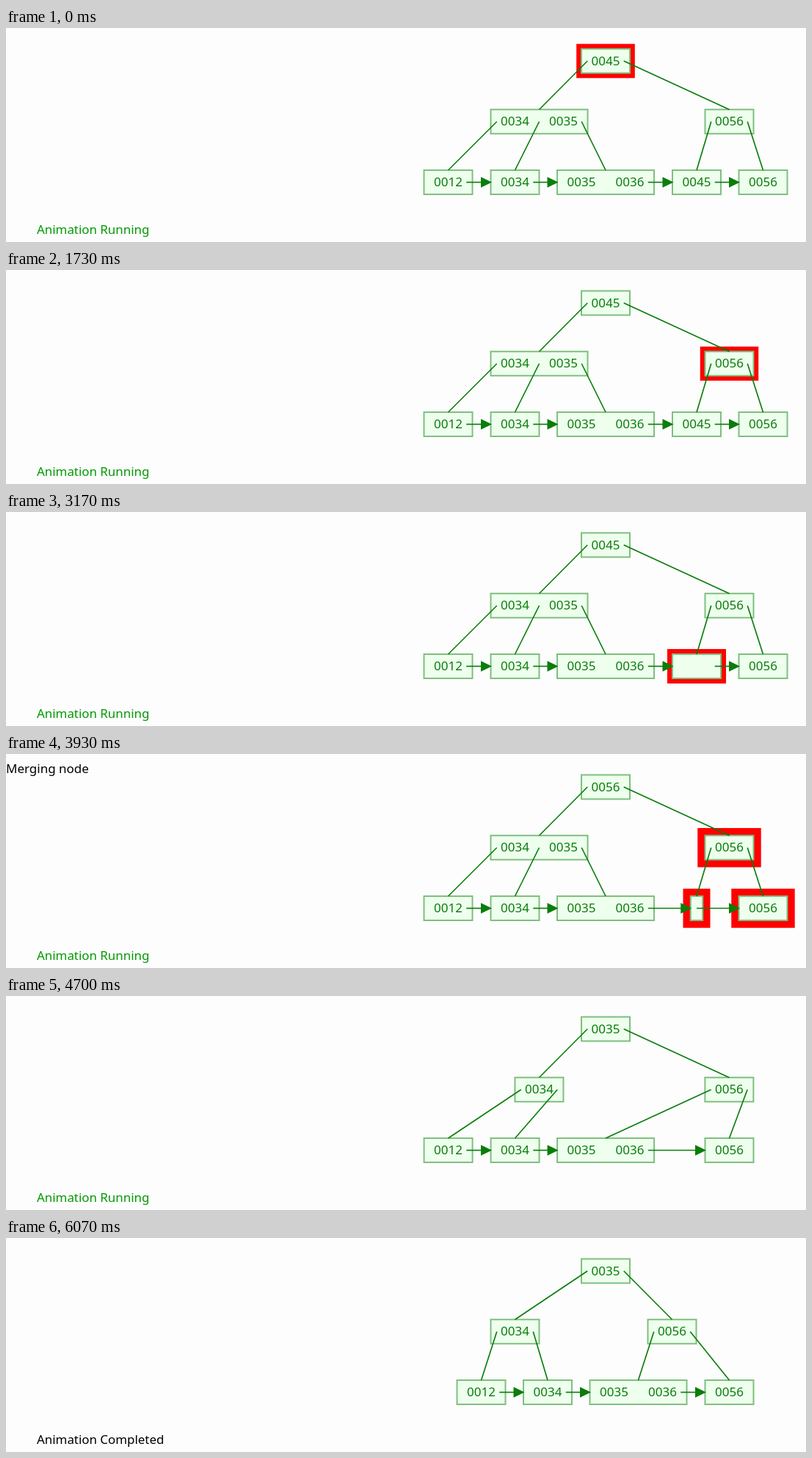
These frames come from a looping animation (1090 by 292 pixels, 6110 ms). An HTML page with a canvas:

```html
<!DOCTYPE html>
<html lang="en">
<head>
<meta charset="utf-8">
<title>B+ tree deletion</title>
<style>
  html, body { margin: 0; width: 100%; height: 100%; overflow: hidden; background: #fdfdfd; }
  canvas { display: block; }
</style>
</head>
<body>
<canvas id="stage" width="1090" height="292"></canvas>
<script>
const ctx = document.getElementById('stage').getContext('2d');

const LOOP = 6110, FIRST_STEP = 464, STEP = 706;
const UNIT = 1.65, ELEMENT = 40 * UNIT, HEIGHT = 20 * UNIT, INSET = 5 * UNIT;
const ROWS = [45, 127.75, 210.5];
const PAPER = '#fdfdfd', FILL = '#eeffee', BORDER = '#7fbf7f', GREEN = '#0a7d0a', RED = '#ff0000';
const FONT = '"Noto Sans", "Open Sans", sans-serif';

// Phases: each lasts one step
const ROOT = 0, ROOT_EDGE = 1, INNER = 2, INNER_EDGE = 3, LEAF = 4, MERGE = 5, STEAL = 6, MOVE = 7, DONE = 8;

const mix = (a, b, p) => a + (b - a) * p;
const width = n => n.keys.length * ELEMENT || 2 * INSET;
const left = n => n.x - width(n) / 2;
const slotX = (n, i) => left(n) + INSET + i * (width(n) - 2 * INSET) / Math.max(1, n.keys.length);
const makeNode = (x, row, keys, lit = false) => ({ x, y: ROWS[row], keys, lit });

// Triangle wave from 0 to 1
function pulse(t) {
  const phase = (t + 140) / 1740 % 1;
  return 1 - Math.abs(2 * phase - 1);
}

function text(str, x, y, color, align = 'center', size = 17) {
  ctx.font = `${size}px ${FONT}`;
  ctx.textAlign = align;
  ctx.fillStyle = color;
  ctx.fillText(str, x, y);
}

function line(x1, y1, x2, y2, color = GREEN, w = UNIT) {
  ctx.strokeStyle = color;
  ctx.lineWidth = w;
  ctx.beginPath();
  ctx.moveTo(x1, y1);
  ctx.lineTo(x2, y2);
  ctx.stroke();
}

function drawNode(n, wave) {
  const x = left(n), y = n.y - HEIGHT / 2, w = width(n);
  if (n.lit) {
    const d = (3 + 4 * wave) * UNIT + 0.8;
    ctx.fillStyle = RED;
    ctx.fillRect(x - d, y - d, w + 2 * d, HEIGHT + 2 * d);
  }
  ctx.fillStyle = FILL;
  ctx.fillRect(x, y, w, HEIGHT);
  ctx.strokeStyle = BORDER;
  ctx.lineWidth = 2;
  ctx.strokeRect(x, y, w, HEIGHT);
  n.keys.forEach((key, i) => text(key, x + ELEMENT * (i + 0.5), n.y + 5.5, GREEN));
}

function drawEdge({ from, slot, to, lit }, wave) {
  const ends = [slotX(from, slot), from.y, to.x, to.y - HEIGHT / 2];
  if (lit) line(...ends, RED, (3 + 2 * wave) * UNIT);
  line(...ends);
}

function drawLink(from, to) {
  const tip = left(to) + 1.5, y = from.y;
  line(slotX(from, from.keys.length), y, tip - 8, y);
  ctx.fillStyle = GREEN;
  ctx.beginPath();
  ctx.moveTo(tip, y);
  ctx.lineTo(tip - 15, y - 7.2);
  ctx.lineTo(tip - 15, y + 7.2);
  ctx.fill();
}

function buildTree(phase, p) {
  const moved = phase < MOVE ? 0 : phase > MOVE ? 1 : p;
  const merged = phase >= STEAL, stolen = phase >= MOVE, merging = phase === MERGE;
  const at = (a, b) => mix(a, b, moved);

  const rootKey = phase < MERGE ? '0045' : merging ? '0056' : stolen ? '0035' : '';
  const root = makeNode(817, 0, [rootKey], phase <= ROOT_EDGE);
  const inner1 = makeNode(at(726.5, 693.5), 1, stolen ? ['0034'] : ['0034', phase === STEAL ? '' : '0035']);
  const inner2 = makeNode(at(985.5, 907.5), 1, [phase === STEAL ? '' : '0056'],
    phase === INNER || phase === INNER_EDGE || merging);

  const leaf1 = makeNode(at(602.5, 647.5), 2, ['0012']);
  const leaf2 = makeNode(at(693.5, 738), 2, ['0034']);
  const leaf3 = makeNode(at(817, 861.5), 2, ['0035', '0036']);
  const last = makeNode(merged ? 985.5 : 1031.5, 2, ['0056'], merging);
  const leaves = [leaf1, leaf2, leaf3, last];

  const edges = [
    { from: root, slot: 0, to: inner1 },
    { from: root, slot: 1, to: inner2, lit: phase === ROOT_EDGE },
    { from: inner1, slot: 0, to: leaf1 },
    { from: inner1, slot: 1, to: leaf2 },
    { from: stolen ? inner2 : inner1, slot: stolen ? 0 : 2, to: leaf3 },
    { from: inner2, slot: 1, to: last }
  ];
  if (!merged) {
    const keys = merging ? [] : [phase === LEAF ? '' : '0045'];
    const doomed = makeNode(941, 2, keys, phase === LEAF || merging);
    leaves.splice(3, 0, doomed);
    edges.push({ from: inner2, slot: 0, to: doomed, lit: phase === INNER_EDGE });
  }
  return { nodes: [root, inner1, inner2, ...leaves], leaves, edges };
}

function draw(t) {
  const steps = (t - FIRST_STEP) / STEP;
  const phase = Math.min(DONE, Math.max(ROOT, Math.floor(steps) + 1));
  const p = steps - Math.floor(steps);
  const wave = pulse(t);
  const { nodes, leaves, edges } = buildTree(phase, p);

  ctx.fillStyle = PAPER;
  ctx.fillRect(0, 0, 1090, 292);
  nodes.forEach(n => drawNode(n, wave));
  edges.forEach(e => drawEdge(e, wave));
  leaves.slice(1).forEach((leaf, i) => drawLink(leaves[i], leaf));

  if (phase === STEAL) {
    text('0035', mix(759.5, 817, p), mix(ROWS[1], ROWS[0], p) + 5.5, GREEN);
    text('0056', mix(817, 985.5, p), mix(ROWS[0], ROWS[1], p) + 5.5, GREEN);
  }

  const message = { [MERGE]: 'Merging node', [STEAL]: 'Stealing from left sibling' }[phase];
  if (message) text(message, 0, 25.5, '#000', 'left');
  if (phase === DONE) text('Animation Completed', 42, 281, '#000', 'left', 16.9);
  else text('Animation Running', 42, 281, '#009900', 'left', 16.9);
}

const start = performance.now();
function tick() {
  draw((performance.now() - start) % LOOP);
  requestAnimationFrame(tick);
}
tick();
</script>
</body>
</html>
```
